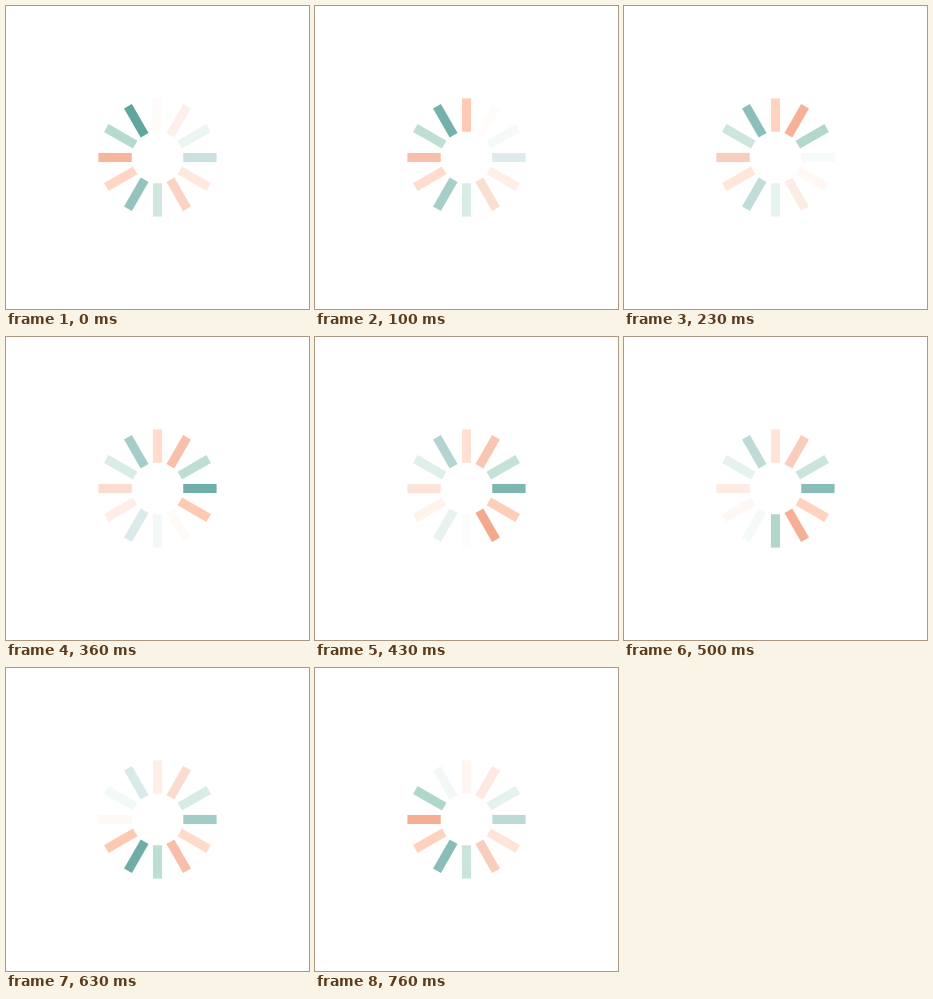
An HTML page for the animation above (0.83 s loop, 303 px wide and 303 px high).

```html
<!DOCTYPE html>
<html lang="en">
<head>
<meta charset="utf-8">
<title>Spinner</title>
<style>
  html, body { margin: 0; width: 100%; height: 100%; overflow: hidden; background: #fff; }
  svg { display: block; width: 100%; height: 100%; }
</style>
</head>
<body>
<svg id="stage" viewBox="0 0 100 100"></svg>
<script>
const LOOP = 830;
const FADE = 2500 / 3;   // one full fade of a bar, ms
const HOLD = 200 / 3;    // each pose stays this long
const FIRST = 100 / 3;   // the first pose is shorter
const COUNT = 12;
const COLORS = ['#ffc9b1', '#f5a78a', '#afd7ca', '#60a69e'];

const stage = document.getElementById('stage');
const bars = Array.from({ length: COUNT }, (_, i) => {
  const bar = document.createElementNS('http://www.w3.org/2000/svg', 'rect');
  const attrs = {
    x: 48.5, y: 30.5, width: 3, height: 11,
    fill: COLORS[i % COLORS.length],
    transform: `rotate(${i * 360 / COUNT} 50 50)`
  };
  for (const key in attrs) bar.setAttribute(key, attrs[key]);
  stage.appendChild(bar);
  return bar;
});

// Snap to the pose on show; poses change on whole 10 ms ticks.
function poseTime(ms) {
  let pose = 0;
  for (let k = 0; k < COUNT; k++) {
    const start = FIRST + k * HOLD;
    if (ms >= Math.floor(start / 10 + 1e-6) * 10) pose = start;
  }
  return pose;
}

function render(ms) {
  const turn = poseTime(ms % LOOP) / FADE;
  bars.forEach((bar, i) => {
    const age = (turn - (i + 1) / COUNT + 2 + 1e-9) % 1;
    bar.setAttribute('opacity', (1 - age).toFixed(4));
  });
}

const begin = performance.now();
function tick() {
  render(performance.now() - begin);
  requestAnimationFrame(tick);
}
tick();
</script>
</body>
</html>
```
